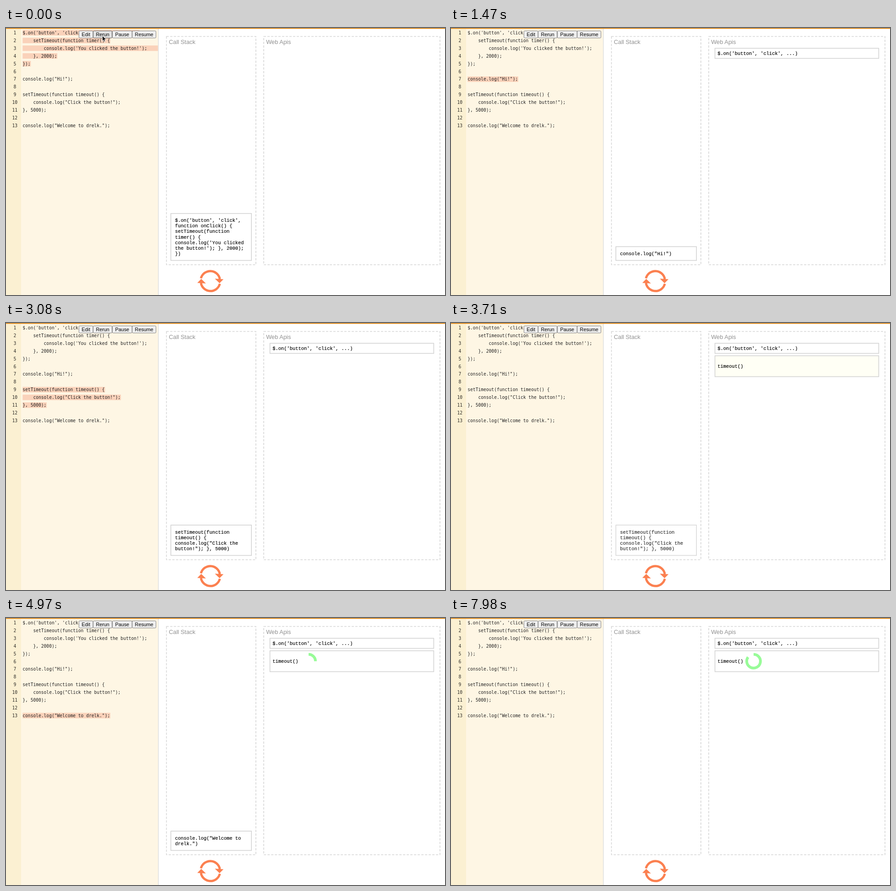
These frames come from a looping animation (959 by 584 pixels, 8 s). An HTML page:

```html
<!DOCTYPE html>
<html lang="en">
<head>
<meta charset="utf-8">
<title>Call stack</title>
<style>
html, body { margin: 0; width: 100%; height: 100%; overflow: hidden; background: #fff; }
svg { display: block; width: 959px; height: 584px; }
text { white-space: pre; }
.code { font: 9.62px "DejaVu Sans Mono", monospace; fill: #222; }
.num { text-anchor: middle; fill: #2c2a26; }
.mono { font: 10.45px "Liberation Mono", "Courier New", monospace; fill: #000; stroke: #000; stroke-width: .15; }
.label { font: 12.9px "Liberation Sans", Arial, sans-serif; fill: #919191; }
.btn { font: 10.8px "Liberation Sans", Arial, sans-serif; text-anchor: middle; fill: #000; }
.box { fill: #fff; stroke: #d3d3d3; stroke-width: 1.6; }
.zone { fill: none; stroke: #d6d6d6; stroke-width: 1.6; stroke-dasharray: 5 3; }
.mark { fill: #fad2ba; }
</style>
</head>
<body>
<svg id="stage" viewBox="0 0 959 584"></svg>
<script>
const NS = 'http://www.w3.org/2000/svg';
const LOOP = 8000;
const CHAR = 5.79, ROW = 16.92;
const stage = document.getElementById('stage');

function add(parent, tag, attrs, text) {
  const el = document.createElementNS(NS, tag);
  for (const k in attrs) el.setAttribute(k, attrs[k]);
  if (text !== undefined) el.textContent = text;
  parent.appendChild(el);
  return el;
}
const rect = (p, x, y, width, height, attrs) => add(p, 'rect', { x, y, width, height, ...attrs });
const label = (p, x, y, cls, s) => add(p, 'text', { x, y, class: cls }, s);
const clamp = v => Math.max(0, Math.min(1, v));
const show = (el, on) => el.setAttribute('visibility', on ? 'visible' : 'hidden');

const code = [
  "$.on('button', 'click', function onClick() {",
  '    setTimeout(function timer() {',
  "        console.log('You clicked the button!');",
  '    }, 2000);',
  '});',
  '',
  'console.log("Hi!");',
  '',
  'setTimeout(function timeout() {',
  '    console.log("Click the button!");',
  '}, 5000);',
  '',
  'console.log("Welcome to drelk.");'
];

// Calls on the stack: code rows, times in and out, wrapped text
const calls = [
  { from: 1, to: 5, start: -1000, end: 516, text: [
    "$.on('button', 'click',", 'function onClick() {', 'setTimeout(function', 'timer() {',
    "console.log('You clicked", "the button!'); }, 2000);", '})'] },
  { from: 7, to: 7, start: 1300, end: 2070, text: ['console.log("Hi!")'] },
  { from: 9, to: 11, start: 2910, end: 3680, text: [
    'setTimeout(function', 'timeout() {', 'console.log("Click the', 'button!"); }, 5000)'] },
  { from: 13, to: 13, start: 4520, end: 5290, text: ['console.log("Welcome to', 'drelk.")'] }
];
const FADE = 170;

// Editor
rect(stage, 0, 0, 959, 584, { fill: '#fff' });
rect(stage, 0, 0, 332.5, 584, { fill: '#fef6e4' });
rect(stage, 0, 0, 33, 584, { fill: '#fbf0d2' });
rect(stage, 332.3, 0, 1.2, 584, { fill: '#d8d8d8' });
rect(stage, 0, 0, 959, 1.8, { fill: '#e08a1c' });

for (const c of calls) {
  c.marks = add(stage, 'g', {});
  for (let n = c.from; n <= c.to; n++) {
    const w = n === 3 ? 295.5 : code[n - 1].length * CHAR + 0.5;
    rect(c.marks, 36.3, 4.4 + (n - 1) * ROW, w, 12, { class: 'mark' });
  }
}
code.forEach((line, i) => {
  const y = 13.9 + i * ROW;
  label(stage, 19.3, y, 'code num', i + 1);
  label(stage, 36.3, y, 'code', line);
});

// Buttons
const buttons = [['Edit', 159.3, 30.7], ['Rerun', 190.5, 41.2], ['Pause', 232.4, 42.8], ['Resume', 275.8, 51.8]]
  .map(([name, x, w]) => {
    const r = rect(stage, x, 6.3, w, 15.6, { rx: 2, fill: '#efefef', stroke: '#767676', 'stroke-width': 0.9 });
    label(stage, x + w / 2, 17.9, 'btn', name);
    return r;
  });

// Zones
rect(stage, 350.5, 18.5, 195.3, 499.2, { class: 'zone' });
rect(stage, 563, 18.5, 385, 499.2, { class: 'zone' });
label(stage, 355.7, 35.1, 'label', 'Call Stack');
label(stage, 568.2, 35.1, 'label', 'Web Apis');

// Stack boxes grow upward from a fixed bottom edge
for (const c of calls) {
  const n = c.text.length, h = n * 12.1 + 18;
  c.box = add(stage, 'g', {});
  rect(c.box, 360.2, 508.4 - h, 176, h, { class: 'box' });
  c.text.forEach((s, i) => label(c.box, 369.2, 496.8 - (n - 1 - i) * 12.1, 'mono', s));
}

// Web API boxes
function apiBox(start, y, h, text) {
  const g = add(stage, 'g', {});
  const r = rect(g, 576.6, y, 357.8, h, { class: 'box' });
  label(g, 582.2, y + h / 2 + 3.3, 'mono', text);
  return { start, g, r };
}
const apis = [
  apiBox(523, 44.4, 22.1, "$.on('button', 'click', ...)"),
  apiBox(3690, 71.6, 45.8, 'timeout()')
];
const ring = add(apis[1].g, 'path', { fill: 'none', stroke: '#98fb98', 'stroke-width': 6 });

// Event loop icon
const icon = add(stage, 'g', { transform: 'translate(446.5 553.5)', fill: '#fb8050' });
for (const a of [0, 180]) {
  const half = add(icon, 'g', { transform: `rotate(${a})` });
  add(half, 'path', { d: 'M-20.6-6A21.1 21.1 0 0 1 20.6-4.5', fill: 'none', stroke: '#fb8050', 'stroke-width': 5 });
  add(half, 'path', { d: 'M9.8-5.3L28.6-4.1L20 4.8Z' });
}

const cursor = add(stage, 'path', {
  d: 'M0 0V11.4L2.6 9L4.5 13L6.4 12.2L4.6 8.2H8.2Z', fill: '#000', stroke: '#fff', 'stroke-width': 0.9
});

function arc(cx, cy, r, turn) {
  const a = turn * 2 * Math.PI;
  const x = cx + r * Math.sin(a), y = cy - r * Math.cos(a);
  return `M${cx} ${cy - r}A${r} ${r} 0 ${turn > 0.5 ? 1 : 0} 1 ${x.toFixed(2)} ${y.toFixed(2)}`;
}

function draw(t) {
  for (const c of calls) {
    show(c.marks, t >= c.start && t < c.end);
    const o = Math.min(clamp((t - c.start) / FADE), 1 - clamp((t - c.end) / FADE));
    c.box.setAttribute('opacity', o.toFixed(3));
  }
  for (const a of apis) {
    const u = t - a.start;
    show(a.g, u >= 0);
    // Yellow pulse on arrival
    const k = clamp(1.05 - Math.abs(u - 107) / 107);
    a.r.style.fill = `rgb(255,${255 - 2 * k},${255 - 41 * k})`;
  }
  const turn = clamp((t - 3725) / 5000);
  ring.setAttribute('d', turn > 0 ? arc(661, 94.5, 15, turn) : '');

  const p = (1 - Math.cos(Math.PI * clamp((t - 70) / 650))) / 2;
  const x = 210.5 + 47.5 * p, y = 17 + 565.6 * p;
  cursor.setAttribute('transform', `translate(${x.toFixed(2)} ${y.toFixed(2)})`);
  show(cursor, t < 740);
  const hover = y < 22;
  buttons[1].setAttribute('fill', hover ? '#e3e3e3' : '#efefef');
  buttons[1].setAttribute('stroke', hover ? '#4f4f4f' : '#767676');
}

let begin;
function tick(now) {
  if (begin === undefined) begin = now;
  draw((now - begin) % LOOP);
  requestAnimationFrame(tick);
}
draw(0);
requestAnimationFrame(tick);
</script>
</body>
</html>
```
